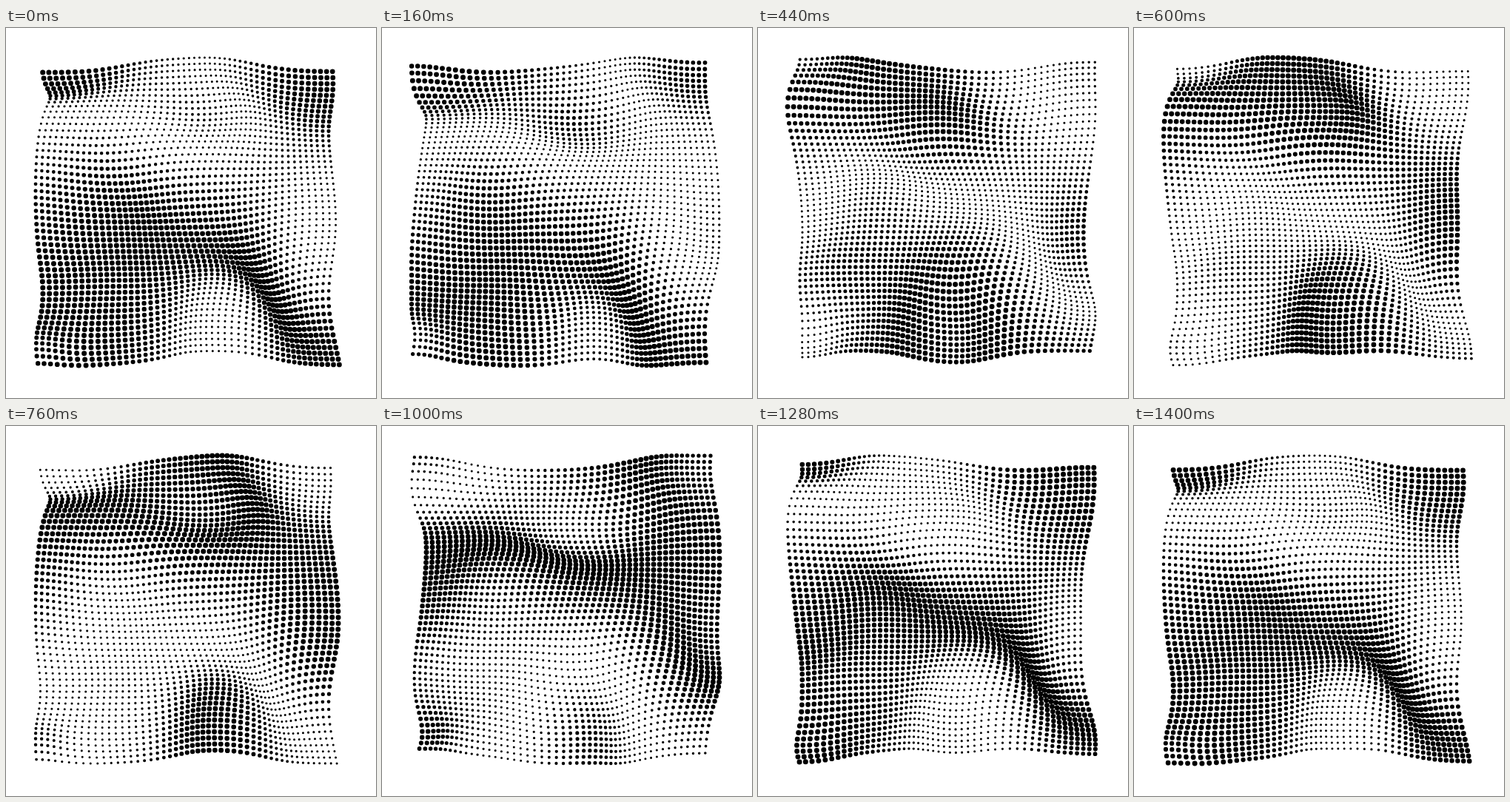
An HTML page with a canvas for the animation above (1.44 s loop, 500 by 500 pixels).

```html
<!DOCTYPE html>
<html lang="en">
<head>
<meta charset="utf-8">
<title>Dot wave</title>
<style>
  html, body { margin: 0; width: 100%; height: 100%; overflow: hidden; background: #fff; }
  canvas { display: block; width: 500px; height: 500px; }
</style>
</head>
<body>
<canvas id="stage" width="500" height="500"></canvas>
<script>
const ctx = document.getElementById('stage').getContext('2d');
const TAU = Math.PI * 2;
const LOOP = 1440, STEPS = 36;
const DOTS = 50, START = 50, SPAN = 396;
const ORBIT = 10, MIN_SIZE = 3, MAX_SIZE = 7;

// Smooth hills and hollows that bend the wave; places and radii in tenths of the square
const hills = [
  { x: 0, y: 0, h: -152, rx: 2.8, ry: 1.45 },
  { x: 9.8, y: 0, h: 183, rx: 3.6, ry: 2.5 },
  { x: 5.5, y: 2, h: -95, rx: 2.6, ry: 1.4 },
  { x: 2.6, y: 4.7, h: 78, rx: 2, ry: 2.2 },
  { x: 10, y: 6.3, h: -118, rx: 2.1, ry: 2.6 },
  { x: 1.5, y: 7.1, h: 42, rx: 2, ry: 1.2 },
  { x: 5.7, y: 8.6, h: 155, rx: 2.1, ry: 2.9 },
  { x: 0, y: 9.6, h: -95, rx: 1.5, ry: 1.1 }
];

// Delay of the swell in degrees: a slope from top to bottom plus the hills
function delay(x, y) {
  return hills.reduce((sum, p) =>
    sum + p.h * Math.exp(-(((x - p.x) / p.rx) ** 2) - ((y - p.y) / p.ry) ** 2), 150 + 25 * y);
}

const dots = Array.from({ length: DOTS * DOTS }, (_, k) => {
  const u = k % DOTS / (DOTS - 1), v = Math.floor(k / DOTS) / (DOTS - 1);
  return {
    x: START + SPAN * u,
    y: START + SPAN * v,
    phase: (90 - delay(10 * u, 10 * v)) * TAU / 360
  };
});

// Each dot swells once and circles twice per loop
function draw(t) {
  ctx.fillStyle = '#fff';
  ctx.fillRect(0, 0, 500, 500);
  ctx.fillStyle = '#000';
  ctx.beginPath();
  for (const { x, y, phase } of dots) {
    const swell = (1 + Math.sin(TAU * t + phase)) / 2;
    const angle = 2 * TAU * t + phase;
    const r = (MIN_SIZE + (MAX_SIZE - MIN_SIZE) * swell) / 2;
    const cx = x + ORBIT * Math.cos(angle), cy = y + ORBIT * Math.sin(angle);
    ctx.moveTo(cx + r, cy);
    ctx.arc(cx, cy, r, 0, TAU);
  }
  ctx.fill();
}

let last = -1;
function tick() {
  const step = Math.floor(performance.now() % LOOP / LOOP * STEPS);
  if (step !== last) draw(step / STEPS);
  last = step;
  requestAnimationFrame(tick);
}
tick();
</script>
</body>
</html>
```
